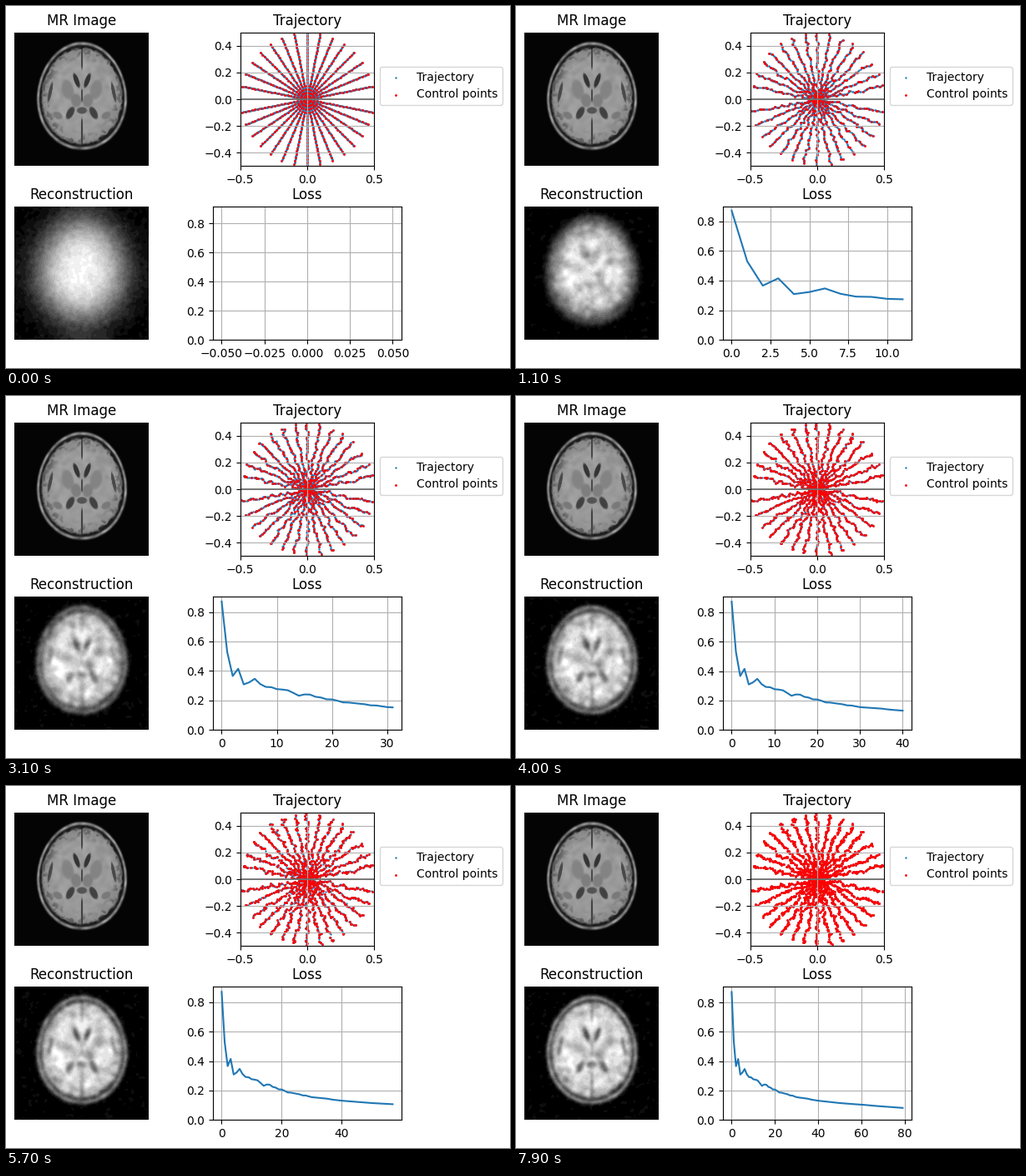
Write a matplotlib script that moves like this. It is 604 px wide and 435 px high and loops after 8 s.

```python
import numpy as np
import matplotlib.pyplot as plt
from matplotlib.animation import FuncAnimation

W, H, DPI = 604, 435, 100
FRAMES, INTERVAL = 80, 100
SIZE = 161
rng = np.random.default_rng(7)

Y, X = np.mgrid[0:SIZE, 0:SIZE].astype(float)
freq = np.fft.fftfreq(SIZE)
K2 = freq[:, None] ** 2 + freq[None, :] ** 2


def blur(img, sigma):
    kernel = np.exp(-2 * np.pi ** 2 * sigma ** 2 * K2)
    return np.fft.ifft2(np.fft.fft2(img) * kernel).real


def smooth_noise(sigma):
    field = blur(rng.normal(size=(SIZE, SIZE)), sigma)
    return field / field.std()


def step(value, edge, soft):
    return 1 / (1 + np.exp(-np.clip((value - edge) / soft, -40, 40)))


# ---------- head slice ----------
v = (Y - 76.5) / 65
HEAD = np.hypot((X - 80.5) / (54 * (1 + 0.06 * v)), v)


def ellipse(img, cx, cy, rx, ry, tone, tilt=0):
    a = np.radians(tilt)
    dx, dy = X - cx, Y - cy
    d = np.hypot((dx * np.cos(a) + dy * np.sin(a)) / rx,
                 (dy * np.cos(a) - dx * np.sin(a)) / ry)
    mask = 1 - step(d, 1, 0.07)
    return img * (1 - mask) + tone * mask


def mirrored(img, dx, cy, rx, ry, tone, tilt=0):
    img = ellipse(img, 80.5 - dx, cy, rx, ry, tone, tilt)
    return ellipse(img, 80.5 + dx, cy, rx, ry, tone, -tilt)


def make_slice():
    folds = smooth_noise(1.6)
    cortex = step(HEAD, 0.74, 0.04)
    brain = 152 + 4 * smooth_noise(2.5)
    brain -= cortex * (14 + 48 * step(folds, 0.75, 0.25))
    brain = mirrored(brain, 17, 69, 7, 12, 128, -12)    # deep grey matter
    brain = mirrored(brain, 7, 82, 6, 8, 122, -10)
    brain = mirrored(brain, 38, 72, 2, 12, 70, 12)      # side fissures
    brain = mirrored(brain, 29, 100, 6, 4, 118, 30)
    brain = mirrored(brain, 6.5, 58, 2.8, 9, 48, -20)   # ventricles
    brain = mirrored(brain, 14, 97, 4, 8, 62, 28)
    brain = ellipse(brain, 80.5, 94, 6, 4, 80)
    brain = ellipse(brain, 80.5, 76, 1.2, 8, 70)
    brain = ellipse(brain, 80.5, 30, 1.2, 15, 65)       # midline
    brain = ellipse(brain, 80.5, 120, 1.3, 17, 62)
    inside = 1 - step(HEAD, 0.885 + 0.012 * folds, 0.01)
    scalp = step(HEAD, 0.945, 0.008) * (1 - step(HEAD, 0.995, 0.008))
    skull = (1 - step(HEAD, 0.96, 0.01)) * (1 - inside)
    ring = 128 + 16 * smooth_noise(2)
    return np.clip(4 + brain * inside + ring * scalp + 18 * skull, 0, 255) / 255


head = make_slice()
mottle = smooth_noise(3.2)
grain_a, grain_b = smooth_noise(1.5), smooth_noise(1.5)
glow = np.exp(-((X - 80.5) ** 2 + (Y - 77) ** 2) / (2 * 30 ** 2))
KEYS = [0, 1, 4, 11, 22, 40, 79]


def reconstruct(n):
    sigma = np.interp(n, KEYS, [18, 11, 6.5, 4, 2.7, 2.1, 1.75])
    bias = np.interp(n, KEYS, [0.15, 0.3, 0.45, 0.5, 0.25, 0.06, 0.03])
    texture = np.interp(n, KEYS, [0.01, 0.03, 0.05, 0.07, 0.08, 0.07, 0.06])
    img = blur(head, sigma) * (1 + bias * glow) * (1 + texture * mottle)
    img = img / np.percentile(img, 99.5) * 0.95
    grain = grain_a * np.cos(0.2 * n) + grain_b * np.sin(0.2 * n)
    return np.clip(img + 0.018 * grain, 0, 1)


# ---------- sampling trajectory ----------
SPOKES = [k for k in range(32) if k % 16]
T = np.linspace(0, 1, 81)
coarse = rng.normal(0, 0.0072, (2, 32, 21))
medium = rng.normal(0, 0.0040, (2, 32, 41))
fine = rng.normal(0, 0.0035, (2, 32, 81))


def spread(noise, t):
    return np.interp(t, np.linspace(0, 1, len(noise)), noise)


def spokes(n, t):
    g1 = 1 - np.exp(-n / 6)
    g2 = 1 - np.exp(-max(n - 20, 0) / 12)
    g3 = 1 - np.exp(-max(n - 40, 0) / 15)
    points = []
    for k in SPOKES:
        a = k * np.pi / 16
        along, across = (g1 * spread(coarse[i, k], t) + g2 * spread(medium[i, k], t)
                         + g3 * spread(fine[i, k], t) for i in (0, 1))
        r = np.minimum(0.495 * t + along, 0.497)
        points.append(np.column_stack([r * np.cos(a) - across * np.sin(a),
                                       r * np.sin(a) + across * np.cos(a)]))
    return np.vstack(points)


def control_points(n):
    count = (20, 23, 40, 80)[n // 20]
    return spokes(n, np.linspace(0, 1, count + 1))


# ---------- loss ----------
start = [0.871, 0.53, 0.366, 0.415, 0.309, 0.323, 0.347, 0.311, 0.292, 0.290, 0.277,
         0.274, 0.269, 0.251, 0.232, 0.241, 0.240, 0.225, 0.220, 0.208, 0.207, 0.198]
tail = [(22, 0.187), (23, 0.186), (25, 0.178), (26, 0.174), (27, 0.167), (28, 0.166),
        (30, 0.155), (32, 0.151), (35, 0.145), (37, 0.138), (40, 0.131), (45, 0.123),
        (50, 0.115), (57, 0.107), (61, 0.103), (67, 0.095), (79, 0.082)]
loss = np.append(start, np.interp(np.arange(len(start), FRAMES), *zip(*tail)))

# ---------- layout ----------
# The small surplus guards against rounding down to one pixel less.
fig = plt.figure(figsize=((W + 0.01) / DPI, (H + 0.01) / DPI), dpi=DPI, facecolor="white")
SIDE = 160.7


def panel(x, top, width, title):
    ax = fig.add_axes([x / W, (H - top - SIDE) / H, width / W, SIDE / H])
    ax.set_title(title)
    return ax


def picture(top, title, img, levels):
    ax = panel(10, top, SIDE, title)
    ax.axis("off")
    return ax.imshow(img, cmap=plt.get_cmap("gray", levels), vmin=0, vmax=1, aspect="auto")


picture(31.7, "MR Image", head, 256)
recon_im = picture(240.6, "Reconstruction", reconstruct(0), 20)

traj_ax = panel(280.55, 31.7, SIDE, "Trajectory")
path = traj_ax.scatter(*spokes(0, T).T, s=0.5, label="Trajectory")
knots = traj_ax.scatter(*control_points(0).T, s=1, color="r", label="Control points")
traj_ax.axhline(0, color="#686868", lw=1.2, zorder=1.6)
traj_ax.grid(True)
traj_ax.set(xlim=(-0.5, 0.5), ylim=(-0.5, 0.5))
traj_ax.legend(loc="right", bbox_to_anchor=(2, 0.6))

loss_ax = panel(248.19, 240.6, 225.45, "Loss")
loss_ax.grid(True)
curve, = loss_ax.plot([0], loss[:1])


def update(n):
    recon_im.set_data(reconstruct(n))
    path.set_offsets(spokes(n, T))
    knots.set_offsets(control_points(n))
    curve.set_data(np.arange(n + 1), loss[:n + 1])
    loss_ax.relim()
    loss_ax.autoscale(True)
    loss_ax.autoscale_view()
    loss_ax.set_ylim(bottom=0)
    return recon_im, path, knots, curve


anim = FuncAnimation(fig, update, frames=FRAMES, interval=INTERVAL,
                     init_func=lambda: update(0), repeat=True, repeat_delay=0)
plt.show()
```
